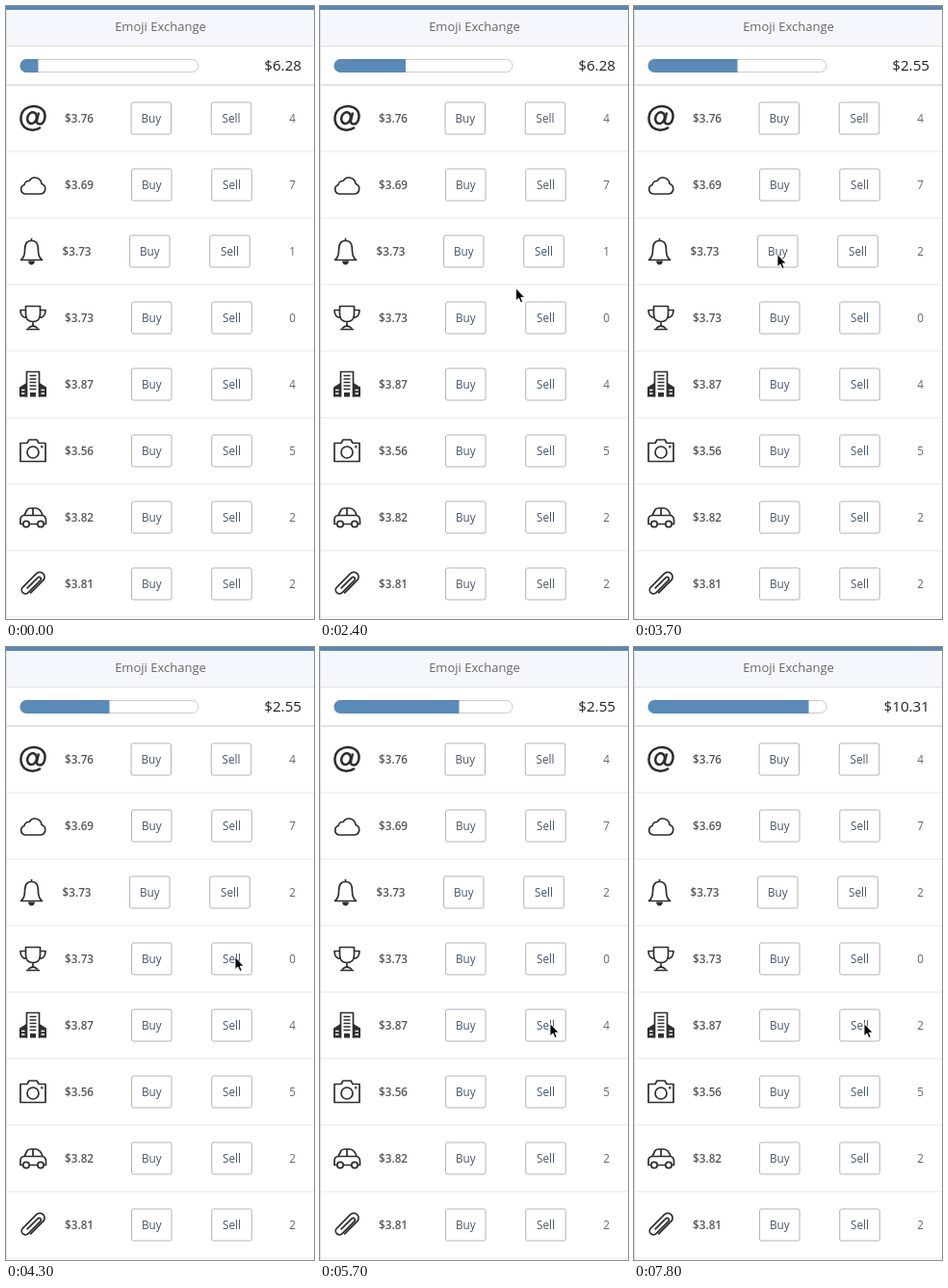
Write an HTML page that moves like this. It is 320 px wide and 636 px high and loops after 8000 ms.

```html
<!DOCTYPE html>
<html lang="en">
<head>
<meta charset="utf-8">
<title>Emoji Exchange</title>
<style>
  html, body { margin: 0; width: 100%; height: 100%; overflow: hidden; background: #fff; }
  svg { display: block; width: 320px; height: 636px; font: 11.7px "Open Sans", "Noto Sans", sans-serif; }
  .icon { fill: none; stroke: #2e2e30; stroke-width: 1.7; stroke-linejoin: round; }
  .icon .solid { fill: #2e2e30; }
  .price { font-weight: 600; fill: #555; text-anchor: end; }
  .count { fill: #666; text-anchor: middle; }
  .button rect { fill: #fff; stroke: #b3b3b6; }
  .button text { fill: #46536a; text-anchor: middle; }
  .button.pressed rect { fill: #5a8ab8; stroke: #5a8ab8; }
  .button.pressed text { fill: #fff; }
  .line { stroke: #e6e6e6; }
</style>
</head>
<body>
<svg viewBox="0 0 320 636">
  <defs><clipPath id="pill"><rect x="14.5" y="55" width="186" height="14" rx="7"/></clipPath></defs>
  <rect width="320" height="636" fill="#fff"/>
  <rect y="4" width="320" height="37" fill="#f4f8fd"/>
  <rect width="320" height="4" fill="#5a86b5"/>
  <path d="M0 41.5H320" stroke="#dedede"/>
  <path d="M0 82H320" stroke="#d9d9d9" stroke-width="1.6"/>
  <path d="M.5 4V636" stroke="#e2e2e2"/>
  <text x="160.5" y="25.5" font-size="13" fill="#666" text-anchor="middle">Emoji Exchange</text>
  <rect x="15" y="55.5" width="185" height="13" rx="6.5" fill="#fff" stroke="#c9c9c9"/>
  <rect id="bar" x="14" y="55" height="14" fill="#5a8ab8" clip-path="url(#pill)"/>
  <text id="balance" x="307" y="66.6" font-size="15.2" fill="#222" text-anchor="end"></text>
  <g id="rows"></g>
  <g id="ring" fill="none">
    <circle r="18" stroke="#fff" stroke-width="3.6"/>
    <circle r="18" stroke="#111" stroke-width="1.6"/>
  </g>
  <path id="cursor" d="M0 0V13L3 10.4L5 15L7.2 14L5.2 9.6H9.2Z" fill="#000" stroke="#fff" stroke-width=".9"/>
</svg>
<script>
const LOOP = 8000;
const $ = id => document.getElementById(id);
const path = (d, extra = '') => `<path d="${d}" ${extra}/>`;
const solid = d => path(d, 'class="solid" stroke="none"');
const circle = (x, y, r) => `<circle cx="${x}" cy="${y}" r="${r}"/>`;

const icons = {
  at: path('M8 9.5C3 13 -4 13.2 -8.5 9.5C-14.5 4 -13.5 -6 -7.5 -10C-1 -14 8 -13 11.5 -7C14 -1.5 11.5 6 7 6C4.2 6 3.6 4 4.2 1.5L6 -6', 'stroke-width="2.5"') +
    '<ellipse cx="-1" rx="4.7" ry="6" transform="rotate(20)" stroke-width="2.5"/>',
  cloud: path('M-8 9.5A4.9 4.9 0 0 1 -9 0A5 5 0 0 1 -4 -4A7 7 0 0 1 9 -1A5.4 5.4 0 0 1 8 9.5Z'),
  bell: path('M-11 9Q-7 6 -7 -1C-7 -8 -5 -11 0 -11C5 -11 7 -8 7 -1Q7 6 11 9ZM0 -11V-13.5') +
    solid('M-3.5 10H3.5Q3 14 0 14T-3.5 10Z'),
  trophy: path('M-7.5 -12H7.5V-4Q7.5 4 0 4T-7.5 -4ZM-7.5 -8H-13Q-13 0 -6 0M7.5 -8H13Q13 0 6 0M0 4V9M-7 12H7M-5 11Q0 6 5 11'),
  building: path('M-6.5 13V-13H6.5V13M-3.5 -9H3.5M-3.5 -5.5H3.5M-3.5 -2H3.5M-3.5 1.5H3.5M-3.5 5H3.5') +
    solid('M-14 13V3L-6 -2V13ZM14 13V3L6 -2V13ZM-3 13V8.5H3V13Z') +
    path('M-12 6H-8.5M-12 9.5H-8.5M8.5 6H12M8.5 9.5H12', 'stroke="#fff" stroke-width="1.4"'),
  camera: path('M-13 -8H-6L-4 -11.5H4L6 -8H13V11H-13Z') + circle(0, 1.5, 6) + circle(9.3, -4.2, .5),
  car: path('M-10.5 7H-13V2Q-13 -1.5 -9 -2L-6 -8Q-5 -9.5 -2 -9.5H3Q8 -9 10 -2Q13.5 -1 13.5 3V7H11.5M4.5 7H-3.5M-9 -2H10M0 -9.5V-2') +
    circle(-7, 7, 3.2) + circle(8, 7, 3.2),
  clip: path('M-9 5H10A5 5 0 0 0 10 -5H-10A4 4 0 0 0 -10 3H8A2 2 0 0 0 8 -1H-8', 'transform="rotate(-45)"')
};

// icon, price, starting count, horizontal nudge of the row's cells
const items = [
  ['at', 3.76, 4, -.5], ['cloud', 3.69, 7, 0], ['bell', 3.73, 1, -2], ['trophy', 3.73, 0, 0],
  ['building', 3.87, 4, 0], ['camera', 3.56, 5, 0], ['car', 3.82, 2, 0], ['clip', 3.81, 2, 0]
];
const button = (label, x) => `<g class="button" transform="translate(${x})">
  <rect x="-20.75" y="-16.5" width="41.5" height="33" rx="2"/><text y="4.2">${label}</text></g>`;

$('rows').innerHTML = items.map(([icon, price, count, dx], i) => `
  <g transform="translate(0 ${116.5 + 69 * i})">
    <g class="icon" transform="translate(${28 + Math.min(0, dx + .5)} 0)">${icons[icon]}</g>
    <text class="price" x="${91 + (dx < -1 ? -2.5 : 0)}" y="4.2">$${price}</text>
    ${button('Buy', 151.3 + dx)}${button('Sell', 234.5 + dx)}
    <text class="count" x="297.5" y="4.2">${count}</text>
    <path class="line" d="M1 34.5H320"/>
  </g>`).join('');
const buttons = document.querySelectorAll('.button');
const counts = document.querySelectorAll('.count');

const clicks = [
  { row: 2, sell: 0, down: 3000, up: 3200, done: 3200, balance: '2.55' },
  { row: 4, sell: 1, down: 5500, up: 5700, done: 5800, balance: '6.43' },
  { row: 4, sell: 1, down: 7300, up: 7500, done: 7700, balance: '10.31' }
];
const moves = [
  { start: 2000, end: 2800, from: [258, 328], to: [149, 257.5] },
  { start: 3900, end: 4300, from: [149, 257.5], to: [238, 321.5] },
  { start: 4900, end: 5300, from: [238, 321.5], to: [239, 390.5] }
];

function cursorAt(t) {
  const { start, end, from, to } = moves.findLast(m => t >= m.start) || moves[0];
  const p = Math.min(1, Math.max(0, (t - start) / (end - start)));
  const eased = p * p * (3 - 2 * p);
  return from.map((v, i) => v + (to[i] - v) * eased);
}

function render(t) {
  const steps = 1 + Math.floor((t + 600) / 1000);
  $('bar').setAttribute('width', 1 + 18.5 * steps);

  const totals = items.map(item => item[2]);
  let balance = '6.28', pressed = null;
  for (const c of clicks) {
    if (t >= c.done) {
      totals[c.row] += c.sell ? -1 : 1;
      balance = c.balance;
    }
    if (t >= c.down && t < c.up) pressed = c;
  }
  $('balance').textContent = '$' + balance;
  counts.forEach((el, i) => el.textContent = totals[i]);
  buttons.forEach((el, i) => el.classList.toggle('pressed', !!pressed && i === pressed.row * 2 + pressed.sell));

  const [x, y] = cursorAt(t);
  $('cursor').setAttribute('transform', `translate(${x} ${y})`);
  $('cursor').style.display = t < moves[0].start ? 'none' : '';
  $('ring').setAttribute('transform', `translate(${x - .5} ${y + 1})`);
  $('ring').style.display = pressed ? '' : 'none';
}

let begin;
function tick(now) {
  begin ??= now;
  render((now - begin) % LOOP);
  requestAnimationFrame(tick);
}
render(0);
requestAnimationFrame(tick);
</script>
</body>
</html>
```
